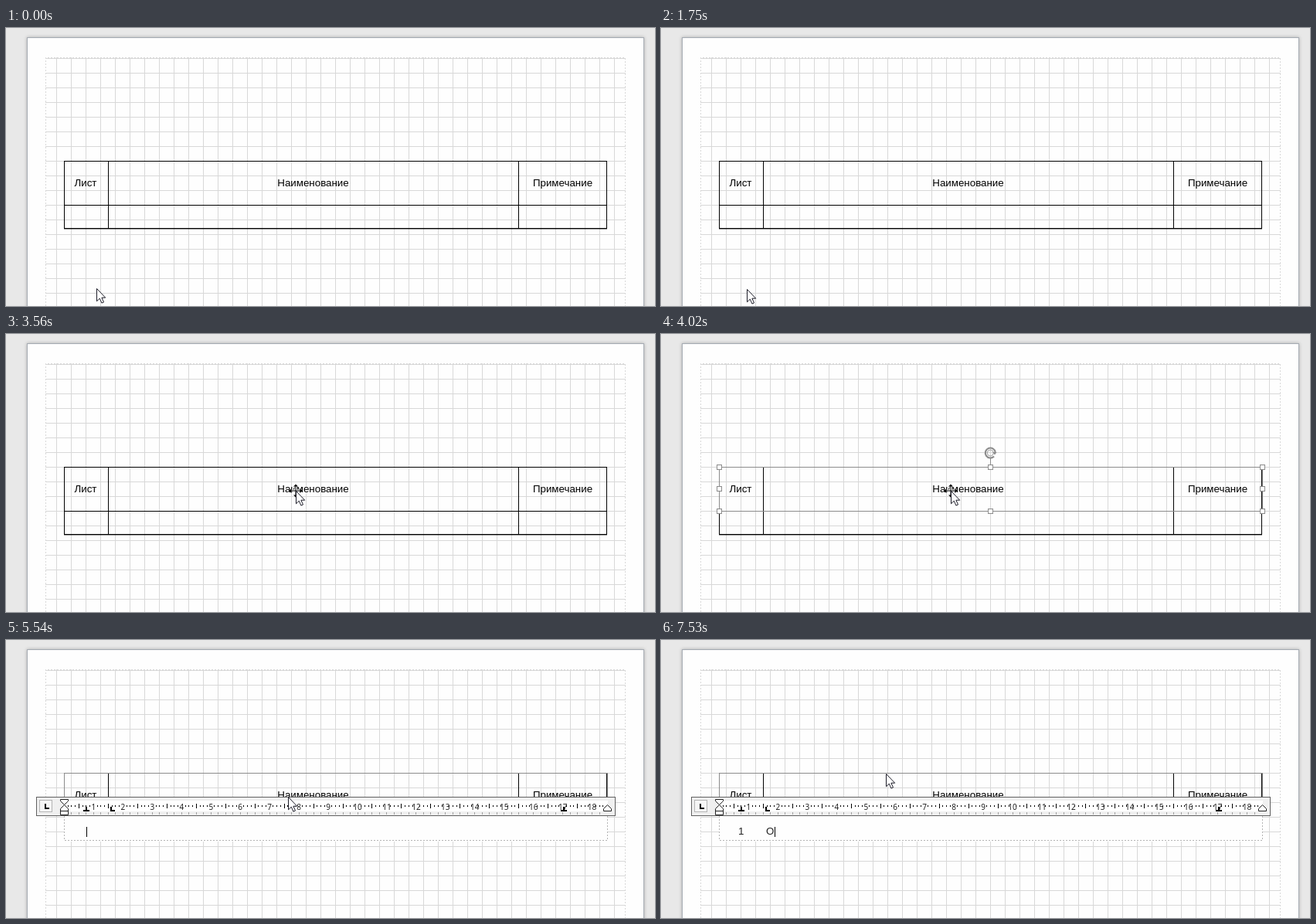
Recreate the animation shown at these times as an HTML page. Size 840 px wide and 360 px high, loop 7990 ms.

```html
<!DOCTYPE html>
<html lang="ru">
<head>
<meta charset="utf-8">
<style>
  html, body { margin: 0; width: 100%; height: 100%; overflow: hidden; background: #e8e8e8; }
  svg { display: block; width: 840px; height: 360px; }
  text { font: 13.33px "Liberation Sans", Arial, sans-serif; text-anchor: middle; }
  #numbers text { font: 10px "Noto Sans", sans-serif; fill: #222; }
  #typed text { text-anchor: start; fill: #222; }
  .crisp { shape-rendering: crispEdges; }
  .line { fill: none; stroke: #000; }
  .gray { fill: none; stroke: #8c8c8c; }
  .grid { fill: none; stroke: #d8d8d8; }
</style>
</head>
<body>
<svg viewBox="0 0 840 360">
  <rect x="27.5" y="12.5" width="798" height="400" fill="#fefefe" stroke="#a5abb3"
        style="filter: drop-shadow(0 0 2px #0004)"/>
  <path id="grid" class="crisp grid"/>
  <path class="crisp grid" stroke-dasharray="2 2" d="M51.5 360V38.5H801.5V360"/>

  <g class="crisp line">
    <path d="M75.5 172.5H777.5V259.5H75.5ZM75.5 229.5H777.5M132.5 172V259M663.5 172V259"/>
    <path d="M75 260H778" stroke="#0006"/>
  </g>
  <text x="103" y="205">Лист</text>
  <text x="397.5" y="205">Наименование</text>
  <text x="720.5" y="205">Примечание</text>

  <g id="selection">
    <path class="crisp gray" d="M75.5 172.5H778.5V229.5H75.5Z"/>
    <path class="crisp line" d="M777.5 173V259M132.5 173V229M663.5 173V229"/>
    <g id="rotate" class="gray">
      <path id="stem" d="M426.5 161V170"/>
      <path d="M431 158.5A6.5 6.5 0 1 1 432.7 153" stroke-width="2.2"/>
      <path d="M429 153H434.5L432 156.5Z" fill="#8c8c8c" stroke="none"/>
      <circle cx="426.3" cy="154" r="4" stroke-width=".8"/>
    </g>
    <g id="handles" class="crisp"></g>
  </g>

  <g id="editor">
    <rect x="75" y="228" width="704" height="33" fill="#fefefe"/>
    <path class="crisp" d="M75.5 228V259.5H778.5V228" fill="none" stroke="#b4b4b4" stroke-dasharray="2 2"/>
    <g class="crisp">
      <rect x="39.5" y="203.5" width="749" height="24" fill="#f0f0f0" stroke="#606060"/>
      <rect x="43.5" y="207.5" width="16" height="15" fill="#f6f6f6" stroke="#b4b4b4"/>
      <path d="M51 212V218H56" fill="none" stroke="#000" stroke-width="2"/>
      <rect x="75" y="208" width="704" height="14" fill="#fff"/>
      <path id="ticks" class="line"/>
      <path id="stops" fill="none" stroke="#a0a0a0"/>
    </g>
    <g id="numbers"></g>
    <path class="crisp" d="M104 216V220M100 221H108M722 216V220M718 221H726M136 216V221H141"
          fill="none" stroke="#000" stroke-width="2"/>
    <g fill="#fff" stroke="#222">
      <path d="M70.5 206.5H80.5V208.5L70.5 218.5V226.5H80.5V218.5L70.5 208.5ZM70.5 221.5H80.5"/>
      <path d="M778.5 213.5L783.5 218.5V221.5H773.5V218.5Z"/>
    </g>
    <g id="typed">
      <text id="digit" x="100" y="252">1</text>
      <text id="letter" x="136" y="252">О</text>
    </g>
    <path id="caret" class="crisp line" d="M.5 242V255"/>
  </g>

  <g id="pointer">
    <g id="move">
      <path d="M-7 0H7M0-7V7" stroke="#fff" stroke-width="3"/>
      <path d="M-7 0H7M0-7V7" stroke="#000"/>
      <path d="M-8.5 0l3-3v6ZM8.5 0l-3-3v6ZM0-8.5l-3 3h6ZM0 8.5l-3-3h6Z"/>
    </g>
    <path d="M.5.5V16.8L4.3 13.2L6.9 19.1L9.5 18L6.9 12.2H11.7Z" fill="#fff" stroke="#1c1c28"/>
  </g>
</svg>
<script>
const LOOP = 7990, HOVER = 3560, SELECT = 3710, EDIT = 4480, BLINK = 530;
const $ = id => document.getElementById(id);
const range = (from, to, step = 1) =>
  Array.from({ length: Math.floor((to - from) / step) + 1 }, (_, i) => from + i * step);

$('grid').setAttribute('d',
  range(65.5, 800, 19).map(x => `M${x} 38V360`).join('') +
  range(39.5, 360, 19).map(y => `M51 ${y}H802`).join(''));

$('handles').innerHTML = [172, 200, 229].flatMap(y =>
  [75, 426, 778].filter(x => x !== 426 || y !== 200).map(x =>
    `<rect x="${x - 2.5}" y="${y - 2.5}" width="6" height="6" fill="#fff" stroke="#8c8c8c"/>`)).join('');

// Ruler: a number per centimetre, a tick per half, a dot per eighth.
const rulerX = cm => 75.5 + cm * 37.95;
const pixelX = cm => Math.floor(rulerX(cm)) + .5;
$('ticks').setAttribute('d', range(1, 147).filter(i => i % 8).map(i =>
  `M${pixelX(i / 8)} ${i % 8 === 4 ? '212V218' : '214V216'}`).join(''));
$('stops').setAttribute('d', range(1, 73).map(i => `M${pixelX(i / 4)} 223V226`).join(''));
$('numbers').innerHTML = range(1, 18).map(n => `<text x="${rulerX(n)}" y="219.5">${n}</text>`).join('');

// Pointer strokes: first and last step time, number of steps, Bézier control points.
const strokes = [
  [120, 540, 4, [[117, 337], [40, 300], [15, 150], [40, -30]]],
  [850, 1750, 7, [[600, -20], [1000, 130], [820, 420], [111, 338]]],
  [1900, 2800, 7, [[111, 338], [-230, -40], [700, -85], [320, 324]]],
  [3110, HOVER, 4, [[320, 324], [375, 240], [375, 203]]],
  [4630, 5540, 7, [[375, 203], [365, 203]]],
  [7230, 7530, 3, [[365, 203], [291, 173]]]
];
const keys = [{ time: EDIT, x: 75 }, { time: 5390, x: 104 }, { time: 6000, x: 108 },
              { time: 6620, x: 136 }, { time: 7380, x: 147 }];

const mix = (a, b, u) => a.map((v, i) => v + (b[i] - v) * u);
const bezier = (points, u) => points.length === 1 ? points[0]
  : bezier(points.slice(1).map((p, i) => mix(points[i], p, u)), u);

function pointerAt(t) {
  const [first, last, steps, points] = strokes.findLast(s => s[0] <= t) ?? strokes[0];
  const step = 1 + Math.floor((t - first) / (last - first) * (steps - 1));
  return bezier(points, Math.max(0, Math.min(1, step / steps)));
}

const show = (id, on) => { $(id).style.display = on ? '' : 'none'; };
const place = (id, x, y) => $(id).setAttribute('transform', `translate(${x} ${y})`);

function draw() {
  const t = performance.now() % LOOP, editing = t >= EDIT;
  place('pointer', ...pointerAt(t));
  show('move', t >= HOVER && !editing);
  show('selection', t >= SELECT);
  show('handles', !editing);
  show('stem', !editing);
  show('rotate', t < EDIT + 150);
  $('rotate').style.opacity = editing ? .4 : 1;

  show('editor', editing);
  show('digit', t >= 6000);
  show('letter', t >= 7380);
  const key = keys.findLast(k => k.time <= t) ?? keys[0];
  place('caret', key.x, 0);
  show('caret', (t - key.time) % (2 * BLINK) < BLINK);
  requestAnimationFrame(draw);
}
draw();
</script>
</body>
</html>
```
